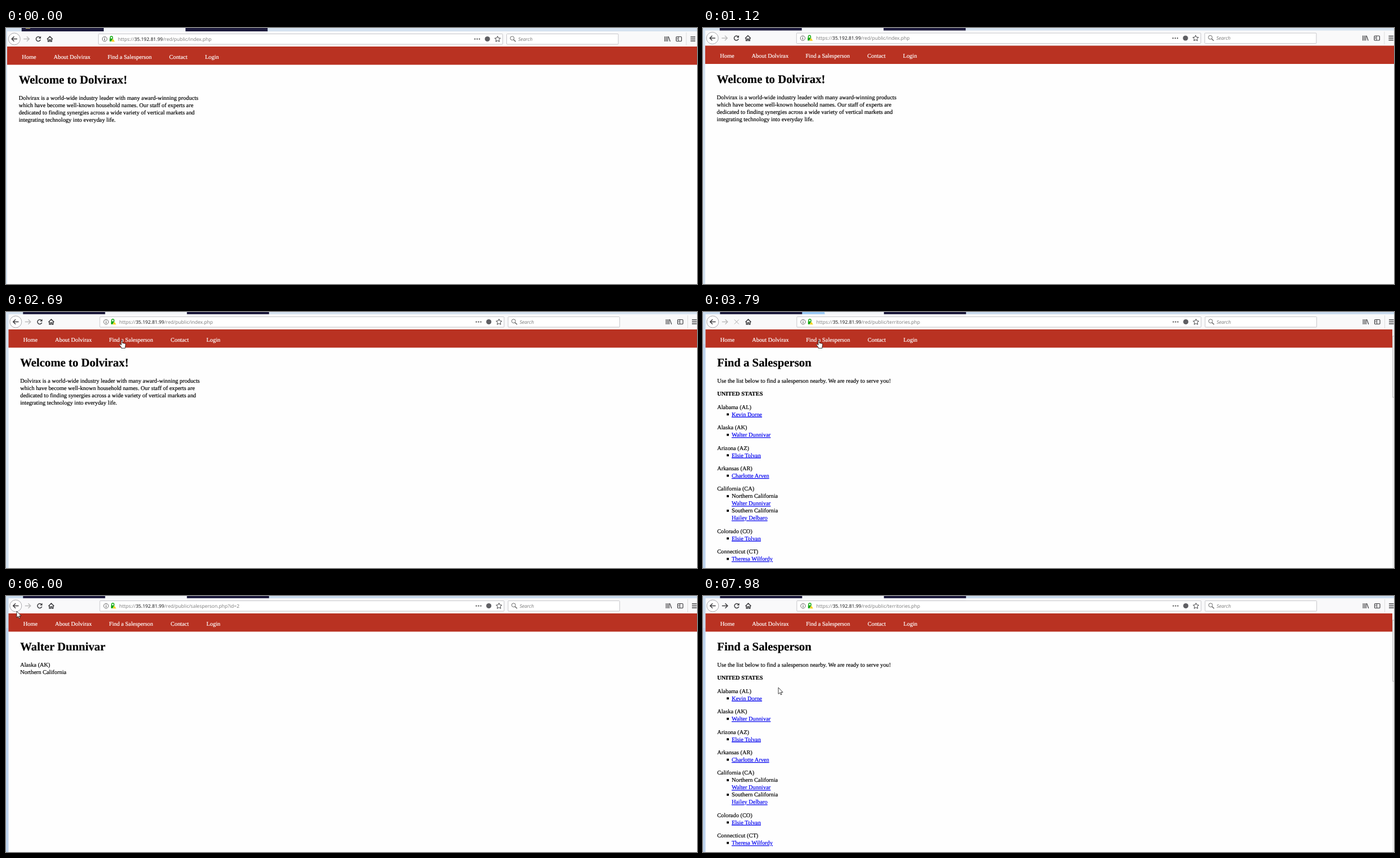
An HTML page that plays this animation: 1229x456 px, repeating every 8000 ms.

```html
<!DOCTYPE html>
<html lang="en">
<head>
<meta charset="utf-8">
<title>Salesperson directory</title>
<style>
html, body { margin: 0; width: 100%; height: 100%; overflow: hidden; background: #fff; }
svg { display: block; width: 1229px; height: 456px; }
text {
  font: 10.4px "Liberation Serif", serif; text-rendering: geometricPrecision; white-space: pre;
  fill: currentColor; stroke: currentColor; stroke-width: .2px;
}
.h1 { font-size: 20.8px; font-weight: 700; }
.bold { font-weight: 700; }
.nav { color: #fff; }
.link { color: #00e; text-decoration: underline 1px; }
.ui { font: 8.55px "Open Sans", "Noto Sans", sans-serif; color: #777; stroke: none; }
.italic { font-style: italic; }
.host { fill: #0c0c0d; }
.icon { fill: none; stroke: #3c3c3f; stroke-width: 1.5; }
.thin { stroke-width: 1; }
.field { fill: #fff; stroke: #c6c6ca; }
</style>
</head>
<body>
<svg id="stage" viewBox="0 0 1229 456"></svg>
<script>
const LINE = 13, GAP = 10.4, LEFT = 25.2;

const text = (x, y, s, cls = "") => `<text x="${x}" y="${y}" class="${cls}">${s}</text>`;
const rect = (x, y, w, h, fill, more = "") =>
  `<rect x="${x}" y="${y}" width="${w}" height="${h}" fill="${fill}" ${more}/>`;
const path = (d, cls = "icon", more = "") => `<path d="${d}" class="${cls}" ${more}/>`;
const group = (id, body) => `<g id="${id}">${body}</g>`;

function starPath(cx, cy, r) {
  const points = Array.from({ length: 10 }, (_, i) => {
    const a = (i * 36 - 90) * Math.PI / 180, d = i % 2 ? r * 0.48 : r;
    return `${(cx + d * Math.cos(a)).toFixed(2)} ${(cy + d * Math.sin(a)).toFixed(2)}`;
  });
  return `M${points.join("L")}Z`;
}

const heading = s => text(LEFT, 97, s, "h1");
const paragraph = lines => lines.map((s, i) => text(LEFT, 126 + i * LINE, s)).join("");

function homePage() {
  return heading("Welcome to Dolvirax!") + paragraph([
    "Dolvirax is a world-wide industry leader with many award-winning products",
    "which have become well-known household names. Our staff of experts are",
    "dedicated to finding synergies across a wide variety of vertical markets and",
    "integrating technology into everyday life."
  ]);
}

// Each state: name, then people; an entry with "|" holds a region and its person.
const STATES = [
  ["Alabama (AL)", "Kevin Dorne"],
  ["Alaska (AK)", "Walter Dunnivar"],
  ["Arizona (AZ)", "Elsie Tolvan"],
  ["Arkansas (AR)", "Charlotte Arven"],
  ["California (CA)", "Northern California|Walter Dunnivar", "Southern California|Hailey Delbaro"],
  ["Colorado (CO)", "Elsie Tolvan"],
  ["Connecticut (CT)", "Theresa Wilfordy"]
];

function listPage() {
  let y = 126 + LINE + GAP;
  let out = heading("Find a Salesperson") +
    paragraph(["Use the list below to find a salesperson nearby. We are ready to serve you!"]) +
    text(LEFT, y, "UNITED STATES", "bold");
  for (const [state, ...people] of STATES) {
    y += LINE + GAP;
    out += text(LEFT, y, state);
    for (const entry of people) {
      const parts = entry.split("|");
      out += rect(42.2, y + LINE - 5.3, 3.8, 3.8, "#000");
      parts.forEach((s, i) => {
        y += LINE;
        out += text(51, y, s, i === parts.length - 1 ? "link" : "");
      });
    }
  }
  return out + rect(1226, 31, 10, 430, "#f0f0f0") +
    rect(1226.8, 43, 10, 109, "#f4f4f4", 'stroke="#a0a0a0" stroke-width=".7"');
}

const personPage = () => heading("Walter Dunnivar") + paragraph(["Alaska (AK)", "Northern California"]);

function urlText(file) {
  return `<text x="201.5" y="20.8" class="ui">https://<tspan class="host">35.192.81.99</tspan>/red/public/${file}</text>`;
}

function chrome() {
  const tabs = rect(30.3, -6, 146, 10.5, "#1c1a3c") + rect(321.8, -6, 146, 10.5, "#1c1a3c") +
    rect(37.5, -4, 8, 3, "#cfc46a");
  const left =
    `<circle cx="17.3" cy="17.5" r="10.5" fill="#fff" stroke="#a8a8ac"/>` +
    path("M22.5 17.5H13M17 13.2L12.7 17.5L17 21.8") +
    path("M33.8 17.5H43.5M39.5 13.2L43.8 17.5L39.5 21.8", "icon", 'id="forward"') +
    group("reload", path("M63.2 15.2A4 4 0 1 0 63.8 18.8") +
      `<path d="M64.6 12.6V16.8H60.4Z" fill="#3c3c3f"/>`) +
    path("M55.8 13.5L63.8 21.5M63.8 13.5L55.8 21.5", "icon thin", 'id="stop" style="stroke:#aaa"') +
    path("M75.5 18L80.5 13L85.5 18M77.2 17.2V22H79.4V19H81.6V22H83.8V17.2");
  const address =
    rect(166.9, 8.5, 719, 18.5, "#fff", 'class="field" rx="1"') +
    `<circle cx="178" cy="17.6" r="4.2" class="icon thin" style="stroke:#666"/>` +
    path("M178 16.8V20M178 15V16", "icon thin") +
    path("M188 17V14.8A2 2 0 0 1 192 14.8V17", "icon", 'style="stroke:#12a812"') +
    rect(186.8, 16.7, 6.2, 5.2, "#12a812") +
    `<path d="M192.8 16.8L196.2 22.5H189.4Z" fill="#f5d21c" stroke="#fff" stroke-width=".4"/>` +
    group("url", "") +
    [836.5, 840.5, 844.5].map(x => `<circle cx="${x}" cy="17.6" r="1.2" fill="#555"/>`).join("") +
    `<circle cx="858.7" cy="17.5" r="4.6" fill="#5f5f63"/>` +
    path(starPath(876.8, 17.9, 5.4), "icon thin");
  const right =
    rect(893, 8.5, 198.5, 18.5, "#fff", 'class="field" rx="1"') +
    `<circle cx="902.8" cy="16.2" r="3.4" class="icon thin" style="stroke:#666"/>` +
    path("M905.2 18.7L909 22.3", "icon", 'style="stroke:#666"') +
    text(913.5, 20.8, "Search", "ui italic") +
    path("M1174.2 13V22M1176.8 13V22M1179.3 13V22M1180.7 13.2L1183.7 22", "icon", 'style="stroke-width:1.2"') +
    rect(1194.5, 13.5, 9.5, 8, "none", 'class="icon" rx="1.3" style="stroke-width:1.2"') +
    path("M1198.6 13.5V21.5M1195.8 16H1197.4M1195.8 18H1197.4", "icon thin") +
    path("M1212.5 6V29", "icon thin", 'style="stroke:#ddd"') +
    path("M1220 14H1228.5M1220 17.5H1228.5M1220 21H1228.5", "icon");
  return rect(-10, -10, 1260, 480, "#d5e2f0", 'id="glass"') +
    rect(-10, 57, 14.5, 410, "#bfd4ee", 'id="edge"') +
    rect(176.3, -6, 145.5, 12, "#f3f6fa") +
    `<circle id="burst" cx="187" cy="8" r="0" fill="#9ccbf7"/>` +
    tabs + rect(4.5, 4, 1240, 27, "#f9f9fa") +
    left + address + right;
}

function nav() {
  const items = [[30.8, "Home"], [87.2, "About Dolvirax"], [183.2, "Find a Salesperson"],
    [292.8, "Contact"], [356.4, "Login"]];
  return rect(4.5, 31, 1240, 32.5, "#b93222") +
    items.map(([x, s]) => text(x, 52.6, s, "nav")).join("");
}

document.getElementById("stage").innerHTML =
  group("scene", chrome() + rect(4.5, 63, 1240, 400, "#fefefe") + nav() +
    group("home", homePage()) + group("list", listPage()) + group("person", personPage())) +
  group("cursor",
    path("M0 0V11.5L2.6 9.1L4.4 13L6.1 12.2L4.4 8.5H8Z", "", 'id="arrow" fill="#fff" stroke="#111" stroke-width=".8"') +
    path("M-1 .8Q0 -.4 1 .8V5.2L5.5 6.2Q7 6.6 6.8 8.2L6 12V14.5H-.8V13L-4.2 8.6Q-4 7 -2.4 7.6L-1 8.8Z",
      "", 'id="hand" fill="#fff" stroke="#111" stroke-width=".8"'));

const el = id => document.getElementById(id);
const PAGES = { home: "index.php", list: "territories.php", person: "salesperson.php?id=2" };

// [time, value...]: every row holds until the next one.
const SHIFT = [[0, -2.5, 2], [150, -2, 1.5], [830, -1.3, 1], [1120, -0.6, 0.5], [1260, 0, 0]];
const PAGE = [[0, "home"], [3655, "list"], [5453, "person"], [6790, "list"]];
const BUTTON = [[0, "ready"], [3520, "stop"], [3920, "faint"], [4460, "ready"], [5030, "stop"],
  [5320, "faint"], [5987, "ready"], [6550, "stop"], [7040, "faint"], [7580, "ready"]];
const BURST = [[0, 0], [3790, 30], [3920, 90], [4060, 0], [6920, 10], [7040, 60], [7170, 0]];
const CURSOR = [
  [0, "none", 0, 0],
  [1690, "arrow", 543, 134], [1850, "arrow", 514, 39.5], [1990, "arrow", 450, 12], [2130, "arrow", 350, 6.5],
  [2270, "arrow", 262, 14], [2410, "arrow", 200, 30], [2550, "hand", 176, 47], [2690, "hand", 206, 50],
  [3920, "hand", 203, 53], [4060, "arrow", 182, 90], [4190, "arrow", 150, 145], [4330, "arrow", 122, 200],
  [4460, "arrow", 105, 232], [4600, "hand", 107.5, 222.4], [5030, "hand", 108.5, 217.4],
  [5320, "arrow", 103, 206], [5453, "arrow", 95, 180], [5587, "arrow", 76, 135], [5720, "arrow", 52, 85],
  [5853, "arrow", 32, 48], [5987, "arrow", 19, 27], [6120, "arrow", 15.5, 20],
  [7170, "arrow", 28, 42], [7310, "arrow", 68, 92], [7450, "arrow", 108, 136],
  [7580, "arrow", 130, 158], [7730, "arrow", 134, 163]
];

const at = (table, t) => table.findLast(row => row[0] <= t).slice(1);
const show = (id, on) => el(id).style.display = on ? "" : "none";
let shownPage;

function draw(t) {
  const [dx, dy] = at(SHIFT, t), [page] = at(PAGE, t), [button] = at(BUTTON, t);
  const [kind, x, y] = at(CURSOR, t);
  el("scene").setAttribute("transform", `translate(${dx} ${dy})`);
  if (page !== shownPage) {
    shownPage = page;
    for (const name in PAGES) show(name, name === page);
    el("url").innerHTML = urlText(PAGES[page]);
  }
  show("edge", t >= 3520);
  el("glass").setAttribute("fill", t >= 3520 ? "#c9dbee" : "#d5e2f0");
  el("burst").setAttribute("r", at(BURST, t)[0]);
  el("forward").style.stroke = t >= 6690 ? "#3c3c3f" : "#bbb";
  show("stop", button === "stop");
  show("reload", button !== "stop");
  el("reload").style.opacity = button === "faint" ? 0.3 : 1;
  show("arrow", kind === "arrow");
  show("hand", kind === "hand");
  el("cursor").setAttribute("transform", `translate(${x} ${y})`);
}

const start = performance.now();
function tick() {
  draw((performance.now() - start) % 8000);
  requestAnimationFrame(tick);
}
tick();
</script>
</body>
</html>
```
